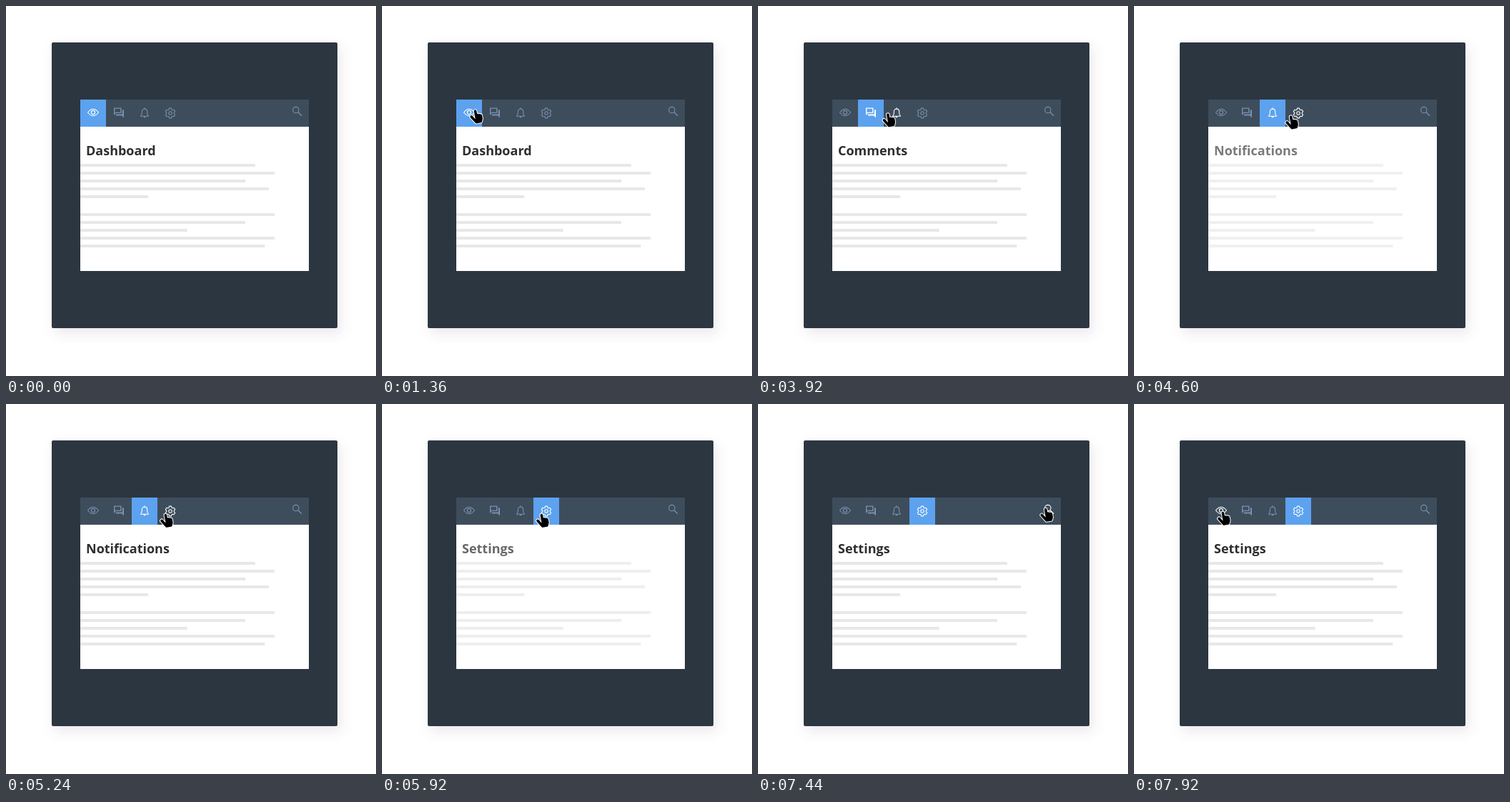
These frames come from a looping animation (518x518 px, 8000 ms). An HTML page:

```html
<!DOCTYPE html>
<html lang="en">
<head>
<meta charset="utf-8">
<title>Tabbed dashboard</title>
<style>
  html, body { margin: 0; width: 100%; height: 100%; overflow: hidden; background: #fff; }
  svg { display: block; width: 100vw; height: 100vh; }
  .panel { fill: #2c3641; filter: drop-shadow(4px 7px 9px rgba(70, 40, 70, .11)); }
  .icon { fill: none; stroke: currentColor; stroke-width: 1.1; stroke-linejoin: round; color: #7890ad; }
  .icon.lit { color: #fff; }
  .solid { fill: currentColor; fill-rule: evenodd; stroke: none; }
  #title { font: 700 18px "Open Sans", "Noto Sans", sans-serif; fill: #2e2e2e; }
  #hand { fill: none; stroke-linecap: round; stroke-linejoin: round; }
</style>
</head>
<body>
<svg viewBox="0 0 518 518">
  <defs>
    <path id="fingers" d="M0 2V15M2.5 8V17M4.7 8.6V17M6.5 9.3V14L5 17.5H-1.2L-6.7 8.8"/>
  </defs>
  <rect width="518" height="518" fill="#fff"/>
  <rect class="panel" x="64" y="51" width="400" height="400" rx="2"/>
  <rect x="104" y="131" width="320" height="38" fill="#3e4d5c"/>
  <rect x="104" y="169" width="320" height="202" fill="#fff"/>
  <rect id="active" y="131" width="36" height="38" fill="#5ca2ef"/>

  <g class="icon" transform="translate(122 149)">
    <path d="M-7.500 0Q0 -9.600 7.500 0Q0 9.600 -7.500 0Z"/>
    <circle r="2.600"/>
  </g>
  <g class="icon" transform="translate(149.600 141) scale(.7)">
    <path class="solid" d="M15 4V11H5.200L4 12.200V4ZM16 2H3Q2 2 2 3V17L6 13H16Q17 13 17 12V3Q17 2 16 2Z"/>
    <path class="solid" d="M21 6H19V15H6V17Q6 18 7 18H18L22 22V7Q22 6 21 6Z"/>
  </g>
  <g class="icon" transform="translate(194 149)">
    <path d="M-5.500 5.200Q-3.700 3.600 -3.700 .5V-1C-3.700 -6.200 3.700 -6.200 3.700 -1V.5Q3.700 3.600 5.500 5.200ZM-1.300 5.500Q0 8.300 1.300 5.500M0 -6.700V-5"/>
  </g>
  <g class="icon" transform="translate(230 150)">
    <path id="gear"/>
    <circle r="2.200"/>
  </g>
  <g class="icon" transform="translate(405.800 145.600)">
    <circle r="4.200"/>
    <path d="M3.100 3.100L8.200 8.200" stroke-width="1.300"/>
  </g>

  <g id="content">
    <text id="title" x="112" y="209"></text>
    <path id="lines" fill="#e8e8e8"/>
  </g>

  <g id="hand">
    <g transform="rotate(-10)">
      <use href="#fingers" stroke="#fff" stroke-width="5.600"/>
      <use href="#fingers" stroke="#000" stroke-width="3.600"/>
    </g>
  </g>
</svg>
<script>
const LOOP = 8000, LEFT = 104, TAB = 36;
const $ = id => document.getElementById(id);
const icons = [...document.querySelectorAll('.icon')];
const swing = u => .5 - Math.cos(Math.PI * Math.min(1, Math.max(0, u))) / 2;

// [click time, title]
const tabs = [[-1000, 'Dashboard'], [2440, 'Comments'], [4240, 'Notifications'], [5520, 'Settings']];

// [start, end, x, y, height of the arc]
const moves = [
  [920, 1440, 131.5, 155],
  [1600, 1840, 155, 154],
  [3600, 3720, 181.5, 150],
  [4440, 4640, 223, 153.5],
  [5950, 6240, 401, 150],
  [6320, 6520, 424, 151],
  [6560, 6800, 409, 148],
  [7390, 7910, 124, 150.5, 33]
];

// Two paragraphs of five bars, widths in percent of a full line
function linesPath(paragraphs) {
  return paragraphs.map((bars, p) => bars.map((percent, i) => {
    const w = 2.72 * percent;
    return `M${LEFT} ${221 + 69 * p + 11 * i}h${w}v4h${-w}z`;
  }).join('')).join('');
}

// Flat teeth with sloping sides around the centre
function gearPath(teeth, root, tip) {
  const points = [];
  for (let i = 0; i < teeth; i++) {
    for (const [turn, r] of [[-.37, root], [-.21, tip], [.21, tip], [.37, root]]) {
      const a = i / teeth * 2 * Math.PI + turn;
      points.push((r * Math.sin(a)).toFixed(2) + ' ' + (-r * Math.cos(a)).toFixed(2));
    }
  }
  return 'M' + points.join('L') + 'Z';
}

function handAt(t) {
  let x = 109, y = -21;
  for (const [from, to, nx, ny, arc = 0] of moves) {
    if (t < from) break;
    const u = swing((t - from) / (to - from));
    x += (nx - x) * u;
    y += (ny - y) * u - arc * Math.sin(Math.PI * u);
  }
  return [x, y];
}

function hoveredIcon(x, y) {
  if (y < 131 || y > 169) return -1;
  if (x >= 388) return 4;
  const i = Math.floor((x - LEFT) / TAB);
  return i < 4 ? i : -1;
}

function draw(t) {
  const tab = tabs.filter(([at]) => t >= at).length - 1;
  const [click, name] = tabs[tab];
  const [x, y] = handAt(t);
  const hover = hoveredIcon(x, y);
  $('active').setAttribute('x', LEFT + TAB * tab);
  $('title').textContent = name;
  $('content').setAttribute('opacity', swing((t - click + 40) / 685));
  $('hand').setAttribute('transform', `translate(${x.toFixed(2)} ${y.toFixed(2)})`);
  icons.forEach((icon, i) => icon.classList.toggle('lit', i === tab || i === hover));
}

$('lines').setAttribute('d', linesPath([[90, 100, 85, 97, 35], [100, 85, 55, 100, 95]]));
$('gear').setAttribute('d', gearPath(6, 5.4, 7));

const start = performance.now();
function tick() {
  draw((performance.now() - start) % LOOP);
  requestAnimationFrame(tick);
}
tick();
</script>
</body>
</html>
```
